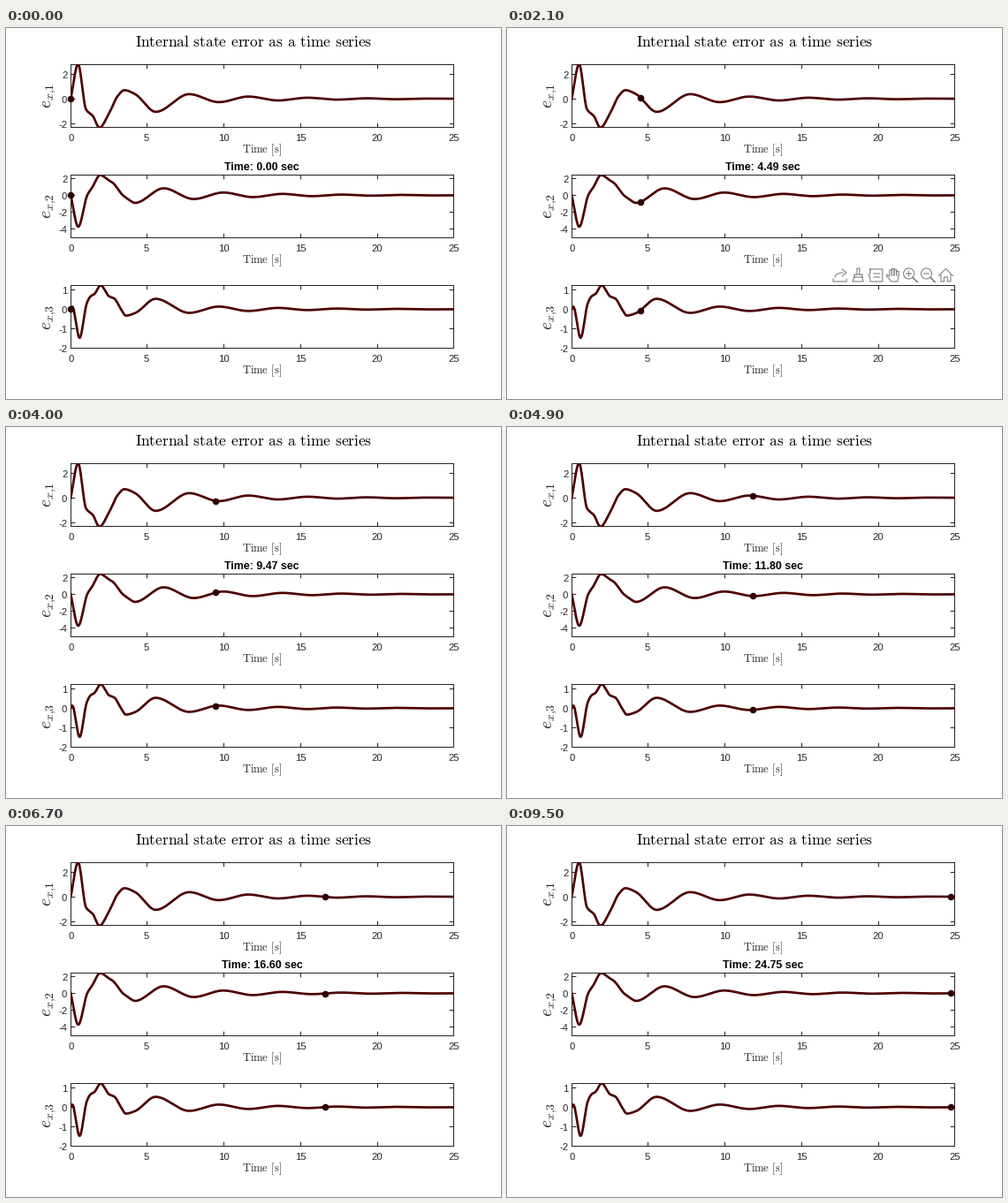
These frames come from a looping animation (560x420 px, 9.6 s). A matplotlib script:

```python
import numpy as np
import matplotlib.pyplot as plt
from matplotlib.animation import FuncAnimation
from matplotlib.patches import Circle, Rectangle

W, H, DPI = 560, 420, 80
PT = 72 / DPI                      # points per pixel
LEFT, RIGHT, HEIGHT = 73.5, 506.5, 71
ORIGIN, SCALE, SPAN = 73.2, 17.34, 25
FRAMES, INTERVAL = 96, 100
INK, LINE, DOT, ICON = "#262626", "#4d0000", "#300000", "#808080"

plt.rcParams["mathtext.fontset"] = "cm"
plt.rcParams["font.family"] = "Liberation Sans"

fig = plt.figure(figsize=(W / DPI, H / DPI), dpi=DPI, facecolor="white")
ax = fig.add_axes([0, 0, 1, 1])
ax.set_xlim(0, W)
ax.set_ylim(H, 0)
ax.axis("off")


def label(x, y, s, px, color=INK, ha="center", **kw):
    return ax.text(x, y, s, fontsize=px * PT, color=color, ha=ha,
                   va="baseline", **kw)


def roman(s):
    return r"$\mathrm{" + s.replace(" ", r"\hspace{0.38}") + "}$"


def stroke(xs, ys, color=INK, px=1.0, **kw):
    return ax.plot(xs, ys, color=color, lw=px * PT, snap=False, **kw)[0]


def smooth(points):
    """Monotone cubic through (x, y) points, flat at every extreme."""
    x, y = np.array(points, float).T
    h = np.diff(x)
    d = np.diff(y) / h
    a, b = d[:-1], d[1:]
    same = a * b > 0
    inner = np.where(same, 2 * a * b / np.where(same, a + b, 1), 0)
    m = np.concatenate([d[:1], inner, d[-1:]])

    def at(q):
        i = np.clip(np.searchsorted(x, q) - 1, 0, len(h) - 1)
        u = (q - x[i]) / h[i]
        return (y[i] + (y[i + 1] - y[i]) * u * u * (3 - 2 * u)
                + h[i] * u * (1 - u) * (m[i] * (1 - u) - m[i + 1] * u))

    return at


def ringing(*keys):
    """Transient through the keys; its last swing then dies out evenly."""
    t, v = keys[-1]
    tail = [(t + 1.93 * k, v * (-0.7) ** k) for k in range(1, 9)]
    return smooth([(0, 0), *keys, *tail, (26, 0)])


error1 = ringing((0.48, 2.8), (1.0, -0.85), (1.45, -1.4), (1.87, -2.33),
                 (2.5, -1.18), (3.05, 0.2), (3.5, 0.7), (4.2, 0.38),
                 (5.55, -1.05), (7.73, 0.38))
error2 = ringing((0.49, -3.7), (1.08, 0), (1.4, 0.9), (1.92, 2.36),
                 (2.5, 1.73), (2.75, 1.45), (3.4, 0), (3.7, -0.4),
                 (4.2, -0.9), (6.06, 0.81), (8.02, -0.45))
error3 = ringing((0.1, 0.13), (0.58, -1.47), (1.05, 0.3), (1.3, 0.66),
                 (1.55, 0.78), (1.95, 1.22), (2.5, 0.66), (2.85, 0.54),
                 (3.28, 0), (3.6, -0.33), (4.2, -0.2), (5.54, 0.53),
                 (7.73, -0.19))

# top edge, zero level, pixels per unit, tick values, curve
PANELS = [(41.5, 80.2, 14.0, range(-2, 3, 2), error1),
          (166.5, 189.3, 9.65, range(-4, 3, 2), error2),
          (291.5, 318.3, 22.1, range(-2, 2), error3)]


def draw_panel(number, top, zero, unit, ticks, curve):
    bottom, tick = top + HEIGHT, 4.3
    stroke([LEFT, RIGHT, RIGHT, LEFT, LEFT], [top, top, bottom, bottom, top],
           solid_joinstyle="miter")
    for sec in range(0, SPAN + 1, 5):
        x = min(np.floor(ORIGIN + sec * SCALE) + 0.5, RIGHT)
        stroke([x, x], [bottom, bottom - tick])
        stroke([x, x], [top, top + tick])
        label(x - 0.3, bottom + 15.5, str(sec), 11.2)
    for value in ticks:
        y = np.floor(zero - value * unit) + 0.5
        stroke([LEFT, LEFT + tick], [y, y])
        stroke([RIGHT, RIGHT - tick], [y, y])
        label(69.3, y + 4.5, str(value), 11.2, ha="right")
    label(289.5, bottom + 28.5, roman("Time [s]"), 12.55)
    label(51, top + HEIGHT / 2, r"$e_{x{,}%d}$" % number, 19.7,
          rotation=90, rotation_mode="anchor")
    t = np.linspace(0, SPAN, 1300)
    line = stroke(ORIGIN + t * SCALE, zero - unit * curve(t), LINE, 2.7,
                  zorder=3)
    line.set_clip_path(Rectangle((73, top - 0.5), 434, HEIGHT + 1,
                                 transform=ax.transData))
    return ax.plot([], [], "o", ms=7.6 * PT, color=DOT, mew=0, zorder=4)[0]


def draw_toolbar():
    parts = []
    cx, cy = 377, 280

    def path(*pts, px=1.1):
        x, y = np.array(pts).T
        parts.append(stroke(cx + x, cy + y, ICON, px))

    def export():
        a = np.linspace(np.pi, 1.5 * np.pi, 12)
        path(*zip(3 + 9 * np.cos(a), 2 + 5 * np.sin(a)))
        path((2, -7), (7, -3), (2, 1))
        path((-8, 4), (-8, 7), (7, 7), (7, 4))

    def brush():
        path((-1, -1), (-1, -8), (2, -8), (2, -1))
        path((-4, 2), (-4, -1), (5, -1), (5, 2), (-4, 2), (-6, 7), (6, 7),
             (5, 2))

    def data_tip():
        path((-6, -7), (8, -7), (8, 7), (-6, 7), (-6, 2), (-8, 0), (-6, -2),
             (-6, -7))
        for y in (-2, 2):
            path((-2, y), (5, y))

    def hand():
        for x, top in zip((-2.6, 0, 2.6, 5.2), (-6, -7.5, -6.5, -4.5)):
            path((x - 1.3, 0), (x - 1.3, top), (x + 1.3, top), (x + 1.3, 0))
        path((-4, 1), (-7, -1), (-7, 1), (-2, 7), (5, 7), (6.5, 0))

    def zoom_out():
        parts.append(ax.add_patch(Circle((cx - 2, cy - 2), 6, fill=False,
                                         ec=ICON, lw=1.1 * PT)))
        path((2.4, 2.4), (7.5, 7.5), px=1.7)
        path((-5, -2), (1, -2))

    def zoom_in():
        zoom_out()
        path((-2, -5), (-2, 1))

    def home():
        path((-8, 0.5), (0, -7.5), (8, 0.5))
        path((-5.5, -1), (-5.5, 7), (-2, 7), (-2, 2), (2, 2), (2, 7),
             (5.5, 7), (5.5, -1))

    for icon in (export, brush, data_tip, hand, zoom_in, zoom_out, home):
        icon()
        cx += 19.9
    return parts


label(280.4, 21, roman("Internal state error as a time series"), 17.35,
      "black")
clock = label(289.5, 161, "", 12.35, "black", weight="bold")
dots = [draw_panel(i + 1, *p) for i, p in enumerate(PANELS)]
toolbar = draw_toolbar()

# Simulated time speeds up slightly, like an adaptive solver
sim_time = smooth([(0, 0), (13, 2.5), (30, 6.9), (49, 11.8), (67, 16.6),
                   (78, 19.69), (95, 24.75)])


def update(frame):
    t = sim_time(frame)
    for dot, (_, zero, unit, _, curve) in zip(dots, PANELS):
        dot.set_data([ORIGIN + t * SCALE], [zero - unit * curve(t)])
    clock.set_text(f"Time: {t:.2f} sec")
    for part in toolbar:
        part.set_visible(11 <= frame < 25)
    return [*dots, clock, *toolbar]


anim = FuncAnimation(fig, update, frames=FRAMES, interval=INTERVAL,
                     repeat=True, repeat_delay=0, blit=False)
plt.show()
```
